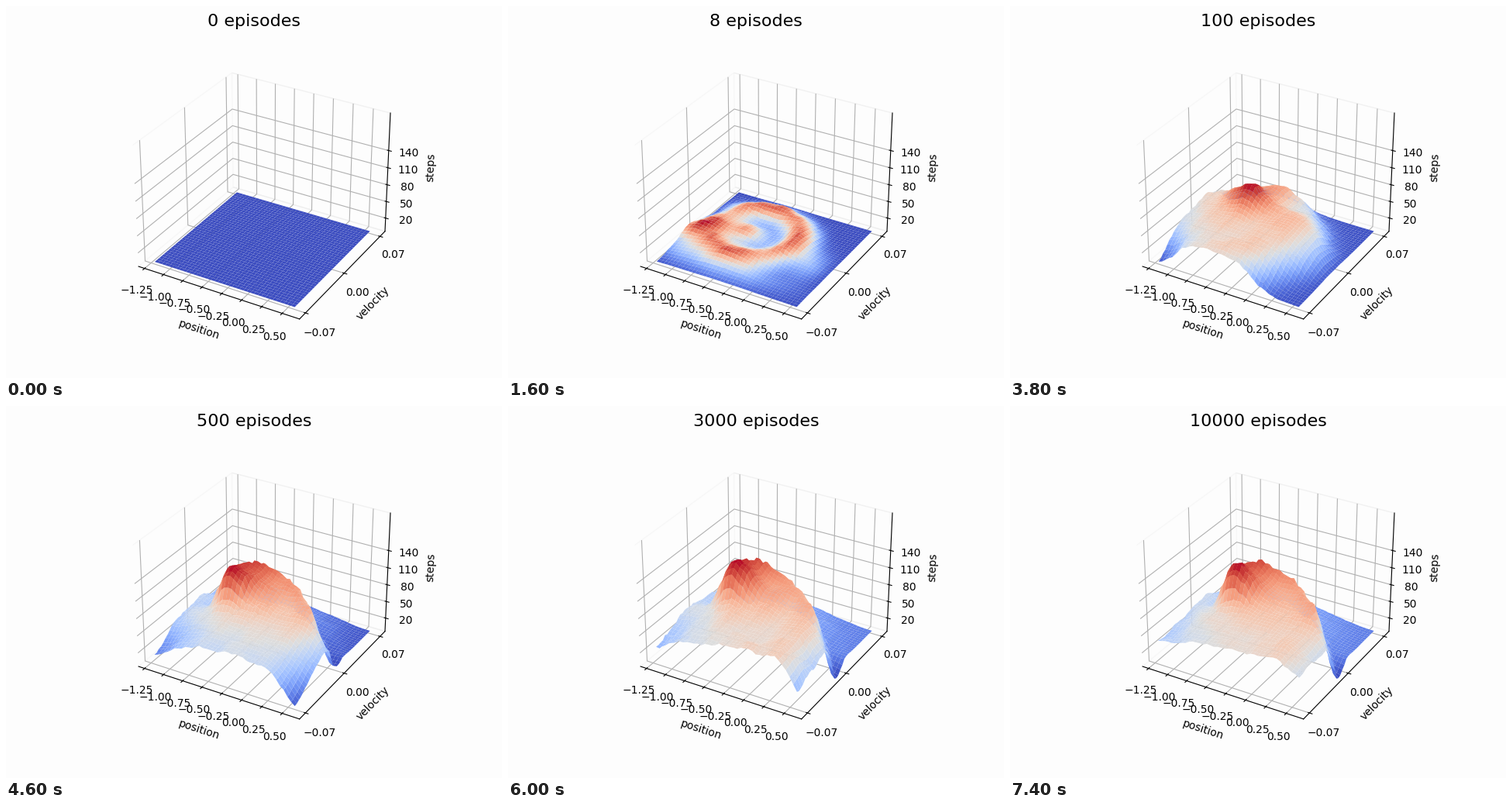
A matplotlib script for the animation above (7.6 s loop, 640 by 480 pixels).

```python
import numpy as np
import matplotlib.pyplot as plt
from matplotlib.animation import FuncAnimation

N = 40
EPISODES = list(range(10)) + list(range(10, 100, 10)) \
    + list(range(100, 1000, 100)) + list(range(1000, 10001, 1000))
X_LIM, Y_LIM = (-1.2, 0.58), (-0.07, 0.07)
X, Y = np.meshgrid(np.linspace(*X_LIM, N), np.linspace(*Y_LIM, N))
U, W = np.meshgrid(np.linspace(0, 1, N), np.linspace(0, 1, N))

# Eight shifted tilings; each array holds the tile number of every grid point
TILES = [(8 * W + 3 * k / 8 % 1).astype(int) * 10
         + (8 * (X + 1.2) / 1.7 + k / 8).astype(int) for k in range(8)]


def tile_fit(z, passes=5):
    """Approximate z the way a tile coder does: in small overlapping steps."""
    out = np.zeros_like(z)
    for _ in range(passes):
        rest = z - out
        for t in TILES:
            total = np.bincount(t.ravel(), rest.ravel(), 100)
            count = np.bincount(t.ravel(), minlength=100)
            out = out + (total / np.maximum(count, 1))[t] / len(TILES)
    return out


def tile_noise(seed):
    rng = np.random.default_rng(seed)
    return sum(rng.normal(size=100)[t] for t in TILES) / len(TILES)


def bump(cu, cw, su, sw):
    return np.exp(-((U - cu) / su) ** 2 - ((W - cw) / sw) ** 2)


def radius(cu, cw, ru, rw):
    return np.hypot((U - cu) / ru, (W - cw) / rw)


def sig(a):
    return 1 / (1 + np.exp(-a))


def bilinear(x, v, nx, nv):
    """Corner indices and weights of the points (x, v) on an nx by nv grid."""
    a = np.clip((x + 1.2) / 1.8, 0, 1) * (nx - 1)
    b = np.clip((v + 0.07) / 0.14, 0, 1) * (nv - 1)
    i = np.minimum(a.astype(int), nx - 2)
    j = np.minimum(b.astype(int), nv - 2)
    a, b = a - i, b - j
    k = j * nx + i
    return [(k, (1 - a) * (1 - b)), (k + 1, a * (1 - b)),
            (k + nx, (1 - a) * b), (k + nx + 1, a * b)]


def sample(flat, corners):
    return sum(flat[k] * w for k, w in corners)


def cost_to_go(nx=145, nv=113, hold=3):
    """Steps an ideal driver needs to leave the valley, by value iteration."""
    gx, gv = np.meshgrid(np.linspace(-1.2, 0.6, nx), np.linspace(*Y_LIM, nv))
    moves = []
    for push in (-1, 1):
        x, v = gx.ravel().copy(), gv.ravel().copy()
        cost = np.zeros(x.size)
        for _ in range(hold):
            live = x < 0.5
            speed = np.clip(v + 0.001 * push - 0.0025 * np.cos(3 * x), *Y_LIM)
            x = np.where(live, np.clip(x + speed, -1.2, 0.6), x)
            v = np.where(live, np.where(x <= -1.2, 0, speed), v)
            cost += live
        moves.append((cost, x < 0.5, bilinear(x, v, nx, nv)))
    value = np.zeros(nx * nv)
    for _ in range(80):
        value = np.minimum(*[c + live * sample(value, corners)
                             for c, live, corners in moves])
    return sample(value, bilinear(np.minimum(X, 0.46), Y, nx, nv))


def early():
    r = radius(0.4, 0.54, 0.30, 0.29)
    z = 17 * np.exp(-((r - 1) / 0.36) ** 2) + 4 * sig((0.9 - r) / 0.1)
    z += 16 * bump(0.35, 0.52, 0.11, 0.1) + 5 * bump(0.2, 0.5, 0.1, 0.12)
    z += 14 * bump(0.02, 0.37, 0.1, 0.13) + 6 * bump(0.1, 0.2, 0.14, 0.12)
    z += 5 * bump(0.68, 0.62, 0.06, 0.12) + 8 * bump(0.45, 0.14, 0.35, 0.12)
    z += 7 * bump(0.86, 0.42, 0.09, 0.15) + 5 * bump(0.3, 0.83, 0.2, 0.08)
    return z * (1 - 0.6 * bump(0.02, 0.68, 0.09, 0.1))


def plateau():
    z = 46 * sig((0.93 - radius(0.28, 0.42, 0.58, 0.56)) / 0.07)
    z -= 32 * bump(0, 0, 0.18, 0.15) + 28 * bump(0, 0.85, 0.14, 0.2)
    z -= 12 * bump(0, 0.18, 0.08, 0.15) + 12 * bump(0.35, 0.85, 0.3, 0.15)
    z -= 24 * bump(0.42, 0.65, 0.08, 0.07)
    z += 10 * bump(0.27, 0.5, 0.1, 0.08) + 9 * bump(0.08, 0.35, 0.08, 0.12)
    z += 10 * bump(0.4, 0.15, 0.12, 0.1) + 11 * bump(0.85, 0.42, 0.08, 0.16)
    return np.maximum(z, 0)


def dome():
    z = 54 * sig((0.93 - radius(0.3, 0.42, 0.6, 0.58)) / 0.075)
    z += 38 * bump(0.33, 0.55, 0.15, 0.14) + 15 * bump(0.44, 0.77, 0.1, 0.08)
    z += 10 * bump(0.65, 0.5, 0.15, 0.12) - 14 * bump(0.57, 0.71, 0.06, 0.08)
    z -= 38 * bump(0, 0, 0.2, 0.18) + 30 * bump(0, 0.85, 0.14, 0.2)
    z += 10 * bump(0.87, 0.42, 0.08, 0.16) - 10 * bump(0, 0.25, 0.1, 0.15)
    return np.maximum(z, 0)


ideal = cost_to_go()
ideal *= 132 / ideal.max()
edge = np.clip((U - 0.85) / 0.15, 0, 1)
low = bump(1, 0.47, 0.07, 0.09)
corner = bump(0, 0, 0.15, 0.2)

late = ideal * (1 - 0.35 * edge) - 36 * low - 13 * corner
middle = late - 20 * edge * bump(1, 0, 1, 0.2) - 9 * corner \
    + 9 * bump(0.28, 0.52, 0.12, 0.12)
young = ideal * (1.03 - 0.15 * (1 - W) ** 2) * (1 - 0.4 * edge) - 8 * low \
    - 38 * bump(1, 0, 0.2, 0.25) - 27 * corner

KEYS = [0, 8, 13, 19, 23, 30, 37]
FIELDS = [tile_fit(z) for z in (0 * U, early(), plateau(), dome(),
                                young, middle, late)]
ROUGH = [0, 4, 5, 6, 6, 9, 6]


def height(i):
    k = min(np.searchsorted(KEYS, i, side="right") - 1, len(KEYS) - 2)
    t = (i - KEYS[k]) / (KEYS[k + 1] - KEYS[k])
    if k == 0:
        t **= 0.6
    z = (1 - t) * FIELDS[k] + t * FIELDS[k + 1]
    amp = (1 - t) * ROUGH[k] + t * ROUGH[k + 1]
    return z + amp * tile_noise(i) * np.clip(z / 25, 0, 1)


def padded(lo, hi, share):
    gap = (hi - lo) * share
    return lo - gap, hi + gap


fig = plt.figure(figsize=(6.4, 4.8), dpi=100, facecolor="#fdfdfd")
ax = fig.add_subplot(projection="3d", facecolor="none")
title = fig.suptitle("", fontsize=16)
ax.set(xlabel="position", ylabel="velocity", zlabel="steps",
       xticks=np.arange(-1.25, 0.6, 0.25), yticks=[-0.07, 0, 0.07],
       zticks=range(20, 150, 30))
ax.set(xlim=padded(*padded(*X_LIM, 0.05), 1 / 48),
       ylim=padded(*padded(*Y_LIM, 0.05), 1 / 48),
       zlim=padded(0, 200, 1 / 48))
for axis in (ax.xaxis, ax.yaxis, ax.zaxis):
    axis.pane.fill = False


def draw(i):
    for surface in list(ax.collections):
        surface.remove()
    ax.plot_surface(X, Y, height(i), cmap="coolwarm", linewidth=0)
    title.set_text(f"{EPISODES[i]} episodes")
    return []


anim = FuncAnimation(fig, draw, frames=len(EPISODES), interval=200,
                     repeat=True, repeat_delay=0)
plt.show()
```
